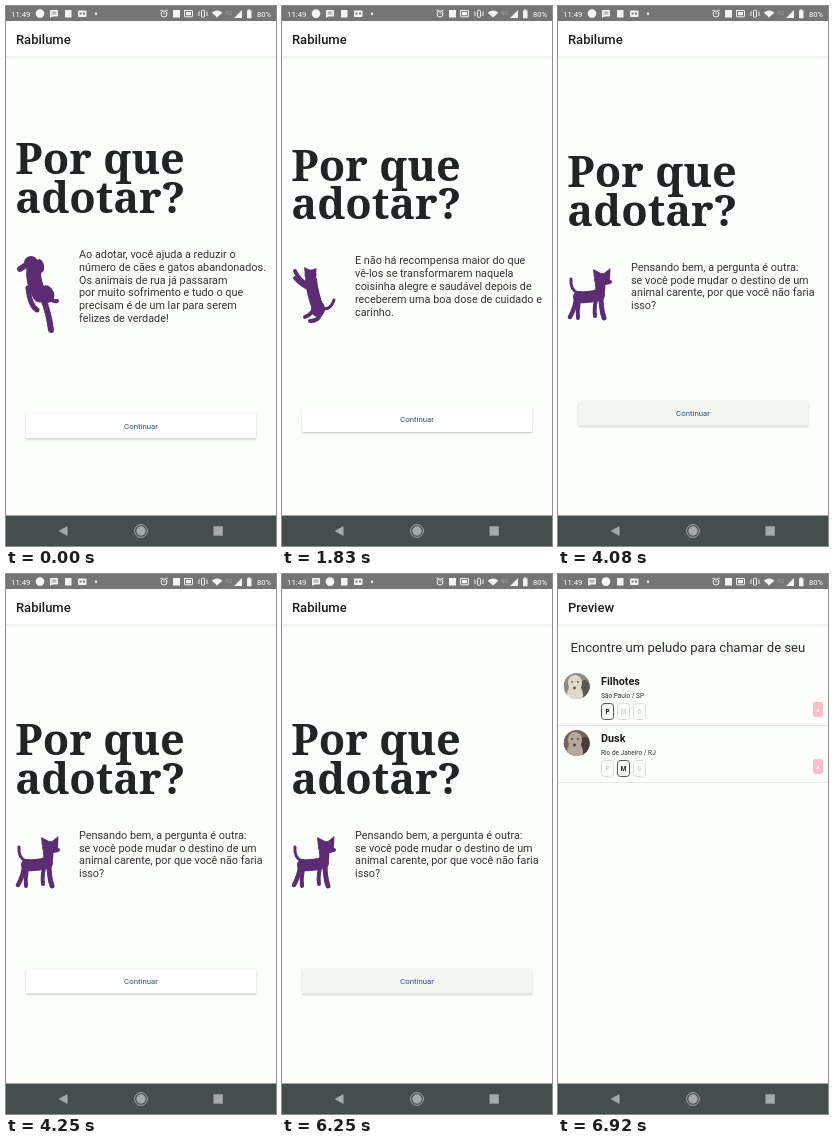
An HTML page with a canvas for the animation above (8 s loop, 270 by 540 pixels).

```html
<!DOCTYPE html>
<html lang="pt-BR">
<head>
<meta charset="utf-8">
<title>Por que adotar?</title>
<style>
html, body { margin: 0; width: 100%; height: 100%; overflow: hidden; background: #fdfffc; }
canvas { display: block; width: 270px; height: 540px; }
</style>
</head>
<body>
<canvas id="stage"></canvas>
<script>
const canvas = document.getElementById('stage');
const ctx = canvas.getContext('2d');
const ratio = window.devicePixelRatio || 1;
canvas.width = 270 * ratio;
canvas.height = 540 * ratio;

const LOOP = 8000, STEP = 1000 / 12, LINE = 12.8;
const PAPER = '#fdfffc', PURPLE = '#5c2d73', ICON = '#f4f4f4', INK = '#1d1d1d';
const SANS = 'Roboto, sans-serif', SERIF = '"Noto Serif", serif';

const clamp = v => Math.min(1, Math.max(0, v));

function rect(x, y, w, h, color, r = 0) {
  ctx.fillStyle = color;
  ctx.beginPath();
  ctx.roundRect(x, y, w, h, r);
  ctx.fill();
}

function outline(x, y, w, h, color, r) {
  ctx.strokeStyle = color;
  ctx.lineWidth = 1;
  ctx.beginPath();
  ctx.roundRect(x, y, w, h, r);
  ctx.stroke();
}

function blob(x, y, rx, ry, color = PURPLE, turn = 0) {
  ctx.fillStyle = color;
  ctx.beginPath();
  ctx.ellipse(x, y, rx, ry, turn, 0, 7);
  ctx.fill();
}

const disc = (x, y, r, color) => blob(x, y, r, r, color);

function ring(x, y, r, color) {
  ctx.strokeStyle = color;
  ctx.lineWidth = 1;
  ctx.beginPath();
  ctx.arc(x, y, r, 0, 7);
  ctx.stroke();
}

function triangle(x1, y1, x2, y2, x3, y3, color = PURPLE) {
  ctx.fillStyle = color;
  ctx.beginPath();
  ctx.moveTo(x1, y1);
  ctx.lineTo(x2, y2);
  ctx.lineTo(x3, y3);
  ctx.fill();
}

// Round-ended curve from a to b, bent towards c.
function limb(width, ax, ay, cx, cy, bx, by) {
  ctx.strokeStyle = PURPLE;
  ctx.lineCap = 'round';
  ctx.lineWidth = width;
  ctx.beginPath();
  ctx.moveTo(ax, ay);
  ctx.quadraticCurveTo(cx, cy, bx, by);
  ctx.stroke();
}

function label(str, x, y, size, color, weight = 400, align = 'left', family = SANS) {
  ctx.font = `${weight} ${size}px ${family}`;
  ctx.textAlign = align;
  ctx.fillStyle = color;
  ctx.fillText(str, x, y);
}

function faded(alpha, paint) {
  ctx.save();
  ctx.globalAlpha = alpha;
  paint();
  ctx.restore();
}

function dog() {
  blob(25, 256.5, 7, 6.5);
  limb(6, 24, 258, 19, 259, 14, 263);
  blob(34, 260, 4, 7, PURPLE, -0.2);
  limb(15, 28, 262, 26, 275, 34, 289);
  blob(41, 288, 7, 9, PURPLE, -0.4);
  limb(4, 44, 293, 48, 296, 51, 295);
  limb(6, 37, 292, 43, 308, 45, 324);
  limb(5, 22, 282, 24, 300, 31, 304);
}

function cat() {
  blob(28.5, 269, 6, 5.5);
  triangle(22, 261, 23, 269, 28, 264);
  triangle(34.5, 262, 29, 264, 34, 270);
  limb(12, 29, 274, 31, 290, 36, 302);
  blob(36, 303, 7, 8);
  limb(4, 13, 265, 17, 274, 26, 279);
  limb(4, 13, 272, 18, 278, 26, 282);
  limb(4, 38, 309, 36, 315, 28, 315);
  limb(4, 32, 304, 28, 309, 23, 311);
  limb(3, 40, 303, 49, 304, 52, 294);
}

function kitten() {
  blob(44, 273.5, 8, 6.5);
  triangle(35, 263, 36, 272, 43, 267);
  triangle(52.5, 262, 46, 267, 52, 273);
  limb(4, 46, 276, 50, 277, 52, 276);
  limb(10, 42, 278, 43, 284, 41, 289);
  limb(12, 21, 291, 30, 292, 41, 289);
  limb(3, 13, 273, 12, 284, 20, 287);
  limb(4.5, 18, 293, 17, 302, 12, 311);
  limb(4, 21, 295, 19, 304, 20, 312);
  limb(4, 38, 294, 36, 303, 37, 310);
  limb(5, 43, 290, 43, 303, 46, 312);
}

const pages = [
  { pet: dog, text: [
    'Ao adotar, você ajuda a reduzir o', 'número de cães e gatos abandonados.',
    'Os animais de rua já passaram', 'por muito sofrimento e tudo o que',
    'precisam é de um lar para serem', 'felizes de verdade!'] },
  { pet: cat, text: [
    'E não há recompensa maior do que', 'vê-los se transformarem naquela',
    'coisinha alegre e saudável depois de', 'receberem uma boa dose de cuidado e', 'carinho.'] },
  { pet: kitten, text: [
    'Pensando bem, a pergunta é outra:', 'se você pode mudar o destino de um',
    'animal carente, por que você não faria', 'isso?'] }
];

function chatIcon(x) {
  rect(x - 4, 4, 8, 6.5, ICON, 0.8);
  triangle(x - 4, 9, x - 4, 12, x - 1, 10, ICON);
  for (const y of [5.7, 7.6]) rect(x - 2.5, y, 5, 0.8, '#777');
}

function statusBar(t) {
  rect(0, 0, 270, 15, '#757575');
  label('11:49', 5, 10.7, 7.8, '#fff');
  const swap = clamp((t - 5950) / 170);
  disc(34 + 14 * swap, 7.6, 4.3, ICON);
  chatIcon(48 - 14 * swap);
  rect(59, 4, 6.5, 7.5, ICON);
  rect(72, 4.5, 8.5, 6.5, ICON, 1);
  for (const x of [73.5, 77]) rect(x, 6.5, 2, 2, '#777');
  disc(90, 7.8, 1.2, ICON);

  ring(158, 8, 3, ICON);
  for (const x of [154.5, 159.5]) rect(x, 3.8, 2.2, 1, ICON);
  rect(157.7, 6, 0.8, 2.5, ICON);
  rect(167, 4, 7, 7.5, ICON);
  outline(178.5, 4.5, 8, 6.3, ICON, 0.5);
  rect(180, 6, 5, 3.3, ICON);
  outline(195.5, 4.3, 3, 7, ICON, 1);
  for (const x of [192.5, 200.5]) rect(x, 5.5, 1, 4.5, ICON);
  ctx.fillStyle = ICON;
  ctx.beginPath();
  ctx.moveTo(211, 11.5);
  ctx.arc(211, 11.5, 7, -Math.PI * 0.77, -Math.PI * 0.23);
  ctx.fill();
  label('4G', 219, 8.5, 6, '#a2a2a2');
  triangle(228, 12, 236, 12, 236, 4, ICON);
  rect(241, 4.2, 4.5, 8, ICON, 0.5);
  rect(242.3, 3.3, 2, 1, ICON);
  label('80%', 251, 10.7, 7.6, '#fff');
}

function appBar() {
  const shade = ctx.createLinearGradient(0, 50, 0, 53);
  shade.addColorStop(0, '#e4e6e3');
  shade.addColorStop(1, PAPER);
  rect(0, 50, 270, 3, shade);
  rect(0, 15, 270, 35.5, '#fefffe');
}

function navBar() {
  const gray = '#a5abab';
  rect(0, 509.5, 270, 30.5, '#434e4d');
  triangle(52.5, 525, 61.5, 520, 61.5, 530, gray);
  ring(135, 525, 6.4, gray);
  disc(135, 525, 4.7, gray);
  rect(207.5, 520.3, 9.3, 9.3, gray);
}

// Press feedback: the ripple spreads for one step, then fades out.
function ripple(t, y) {
  for (const start of [1500, 3917, 6083]) {
    const n = Math.round((t - start) / STEP);
    if (n < 0 || n > 3) continue;
    ctx.save();
    ctx.beginPath();
    ctx.rect(20, y, 230, 25);
    ctx.clip();
    ctx.globalAlpha = Math.min(1, 1.33 - n / 3);
    disc(235, y + 12.5, 128 * (n + 1), '#eef0ef');
    ctx.restore();
  }
}

function button(y, t) {
  ctx.save();
  ctx.shadowColor = 'rgba(0,0,0,.25)';
  ctx.shadowBlur = 2 * ratio;
  ctx.shadowOffsetY = ratio;
  rect(20, y, 230, 25, '#fefffe', 1);
  ctx.restore();
  ripple(t, y);
  label('Continuar', 135, y + 15.4, 7.8, '#2b5278', 400, 'center');
}

// The block is centred, so each missing text line lowers it by half a line.
function introPage({ pet, text }, t) {
  const shift = (6 - text.length) * LINE / 2;
  label('Por que', 9.3, 168.3 + shift, 43.2, '#222423', 700, 'left', SERIF);
  label('adotar?', 9.3, 206.8 + shift, 43.2, '#222423', 700, 'left', SERIF);
  pet();
  text.forEach((line, i) => label(line, 73, 252 + shift + i * LINE, 10.85, '#333'));
  button(407.3 - shift, t);
}

function avatar(y, back, coat, shade) {
  ctx.save();
  ctx.beginPath();
  ctx.arc(18.7, y, 13, 0, 7);
  ctx.clip();
  rect(5, y - 14, 28, 28, back);
  blob(27, y + 4, 6, 10, shade);
  blob(17, y + 9, 8, 11, coat);
  blob(17, y - 3, 7, 8, coat);
  for (const x of [14, 20]) disc(x, y - 4, 0.9, shade);
  disc(16.5, y + 2, 1.4, shade);
  ctx.restore();
}

function petRow(y, name, place, size, photo) {
  avatar(y + 17, ...photo);
  label(name, 43, y + 15.5, 10.8, '#1b1b1b', 700);
  label(place, 43, y + 28.8, 6.5, '#333');
  ['P', 'M', 'G'].forEach((letter, i) => {
    const x = 43.5 + i * 16, on = letter === size;
    outline(x, y + 34.5, 12, 16, on ? '#555' : '#dcdddc', 3);
    label(letter, x + 6, y + 44.8, 6.3, on ? '#111' : '#d2d3d2', 700, 'center');
  });
  rect(255, y + 33, 10, 15, '#f9bec8', 3);
  label('x', 260, y + 42.5, 6, '#fff', 700, 'center');
  rect(0, y + 56, 270, 1, '#e5e6e5');
}

function listPage() {
  label('Preview', 10, 38, 13, INK, 500);
  label('Encontre um peludo para chamar de seu', 12.5, 77.5, 13.1, '#2b2b2b');
  petRow(95, 'Filhotes', 'São Paulo / SP', 'P', ['#8d8b82', '#e0d8c8', '#5d584e']);
  petRow(152, 'Dusk', 'Rio de Janeiro / RJ', 'M', ['#75655b', '#b5a89f', '#4b3a33']);
}

function draw(now) {
  const t = Math.floor((now % LOOP + 4) / STEP) * STEP;
  const page = pages[t < 1660 ? 0 : t < 4080 ? 1 : 2];
  const fade = clamp((t - 6480) / 270);
  const veil = fade ** 1.4;

  ctx.setTransform(ratio, 0, 0, ratio, 0, 0);
  rect(0, 0, 270, 540, PAPER);
  appBar();
  introPage(page, t);
  faded(veil, () => rect(0, 53, 270, 457, PAPER));
  faded(1 - veil, () => label('Rabilume', 10, 38, 13, INK, 500));
  faded(fade ** 2.5, listPage);
  statusBar(t);
  navBar();
}

const begin = performance.now();
function tick() {
  draw(performance.now() - begin);
  requestAnimationFrame(tick);
}
tick();
</script>
</body>
</html>
```
